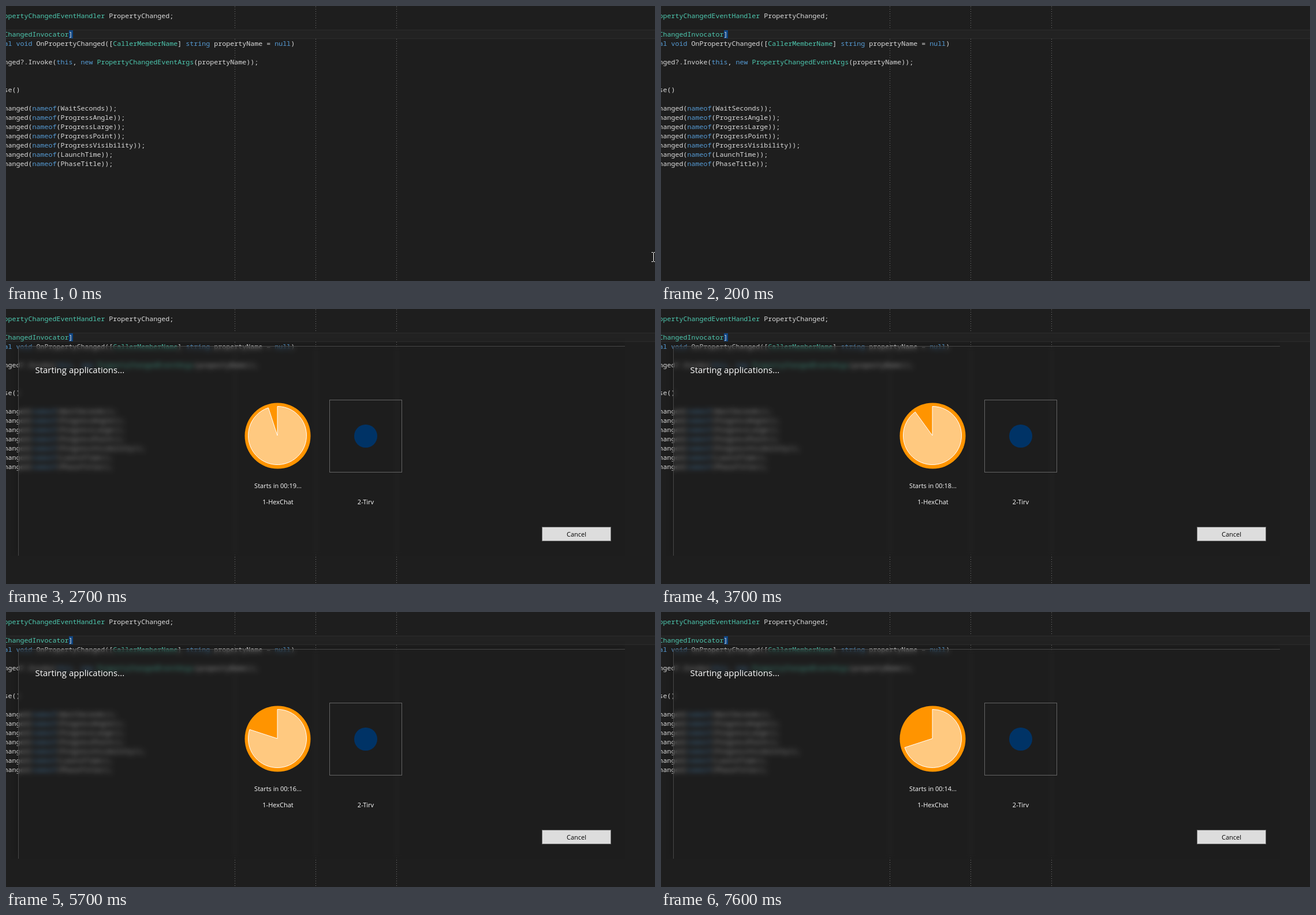
Recreate the animation shown at these times as an HTML page. Size 1124 px wide and 476 px high, loop 8 s.

```html
<!DOCTYPE html>
<html lang="en">
<head>
<meta charset="utf-8">
<title>Launch countdown</title>
<style>
  html, body { margin: 0; width: 100%; height: 100%; overflow: hidden; background: #1e1e1e; }
  body > *, #panel > * { position: absolute; }
  .guide {
    top: 1px; width: 1px; height: 475px;
    background: repeating-linear-gradient(#777 0 1px, transparent 1px 4px);
  }
  #line {
    left: 0; top: 41px; width: 1124px; height: 16px; box-sizing: border-box;
    background: #222; border: solid #2c2c2c; border-width: 1px 0;
  }
  #brace { left: 109px; top: 42px; width: 7px; height: 14px; background: #0e4583; }
  pre {
    left: -3.5px; top: 9px; margin: 0; color: #dcdcdc;
    font: 500 11.667px/16px "Noto Sans Mono", monospace;
  }
  pre b { font-weight: inherit; color: #4ec9b0; }
  pre i { font-style: normal; color: #569cd6; }
  #panel {
    left: 21px; top: 64px; width: 1051px; height: 363px; box-sizing: border-box;
    border: solid #474747; border-width: 1px 0 0 1px;
    background: rgba(30, 30, 30, .3); backdrop-filter: blur(4px);
    box-shadow: 0 0 12px rgba(0, 0, 0, .25); clip-path: inset(-13px 0 0 -12px);
  }
  #panel svg { left: -1px; top: -1px; }
  svg text { font: 500 11px "Open Sans", sans-serif; fill: #fff; text-anchor: middle; }
  svg .title { font-size: 15px; text-anchor: start; }
  svg .dark { font-weight: 400; fill: #000; }
</style>
</head>
<body>
<div class="guide" style="left:396px"></div>
<div class="guide" style="left:536px"></div>
<div class="guide" style="left:676px"></div>
<div id="line"></div>
<div id="brace"></div>
<pre><b>opertyChangedEventHandler</b> PropertyChanged;

<b>ChangedInvocator</b>]
<i>al void</i> OnPropertyChanged([<b>CallerMemberName</b>] <i>string</i> propertyName = <i>null</i>)

nged?.Invoke(<i>this</i>, <i>new</i> <b>PropertyChangedEventArgs</b>(propertyName));


se()

hanged(<i>nameof</i>(WaitSeconds));
hanged(<i>nameof</i>(ProgressAngle));
hanged(<i>nameof</i>(ProgressLarge));
hanged(<i>nameof</i>(ProgressPoint));
hanged(<i>nameof</i>(ProgressVisibility));
hanged(<i>nameof</i>(LaunchTime));
hanged(<i>nameof</i>(PhaseTitle));</pre>

<div id="panel">
  <svg width="1051" height="363" viewBox="21 64 1051 363">
    <text class="title" x="50.5" y="111">Starting applications...</text>
    <circle cx="470.5" cy="219.5" r="57" fill="#ff9400"/>
    <path id="pie" fill="#fff" fill-opacity=".5" stroke="#fff"/>
    <text id="count" x="471" y="310"></text>
    <text x="471" y="338">1-HexChat</text>
    <rect x="560.5" y="157.5" width="125" height="125" fill="none" stroke="#646464"/>
    <circle cx="623" cy="220" r="20" fill="#003366"/>
    <text x="623" y="338">2-Tirv</text>
    <rect x="928.5" y="377.5" width="119" height="24" fill="#ddd" stroke="#707070"/>
    <text class="dark" x="988" y="394">Cancel</text>
  </svg>
</div>

<svg id="cursor" width="9" height="17" fill="none" stroke="#fff">
  <path d="M1 .5H3.5L4.5 1.5L5.5 .5H8M4.5 1V16M1 16.5H3.5L4.5 15.5L5.5 16.5H8"/>
</svg>

<script>
const $ = id => document.getElementById(id);
const LOOP = 8000, OPEN = 2600, TOTAL = 20;
const ticks = [2700, 3700, 4700, 5700, 6600, 7600];

// Sector that starts at twelve o'clock and runs clockwise.
function sector(part, cx = 470, cy = 219, r = 50.5) {
  const angle = Math.min(part, 0.9999) * 2 * Math.PI;
  const x = cx + r * Math.sin(angle), y = cy - r * Math.cos(angle);
  return `M${cx} ${cy}V${cy - r}A${r} ${r} 0 ${+(part > 0.5)} 1 ${x} ${y}Z`;
}

function draw(now) {
  const t = now % LOOP;
  const left = TOTAL - ticks.filter(tick => t >= tick).length;
  $("panel").style.display = t < OPEN ? "none" : "block";
  $("pie").setAttribute("d", sector(left / TOTAL));
  $("count").textContent = `Starts in 00:${left}...`;

  const [x, y] = t < 100 ? [1117, 426] : [996, 86];
  $("cursor").style.cssText = `left:${x}px;top:${y}px;display:${t < 200 ? "block" : "none"}`;
}

const start = performance.now();
function frame() {
  draw(performance.now() - start);
  requestAnimationFrame(frame);
}
frame();
</script>
</body>
</html>
```
